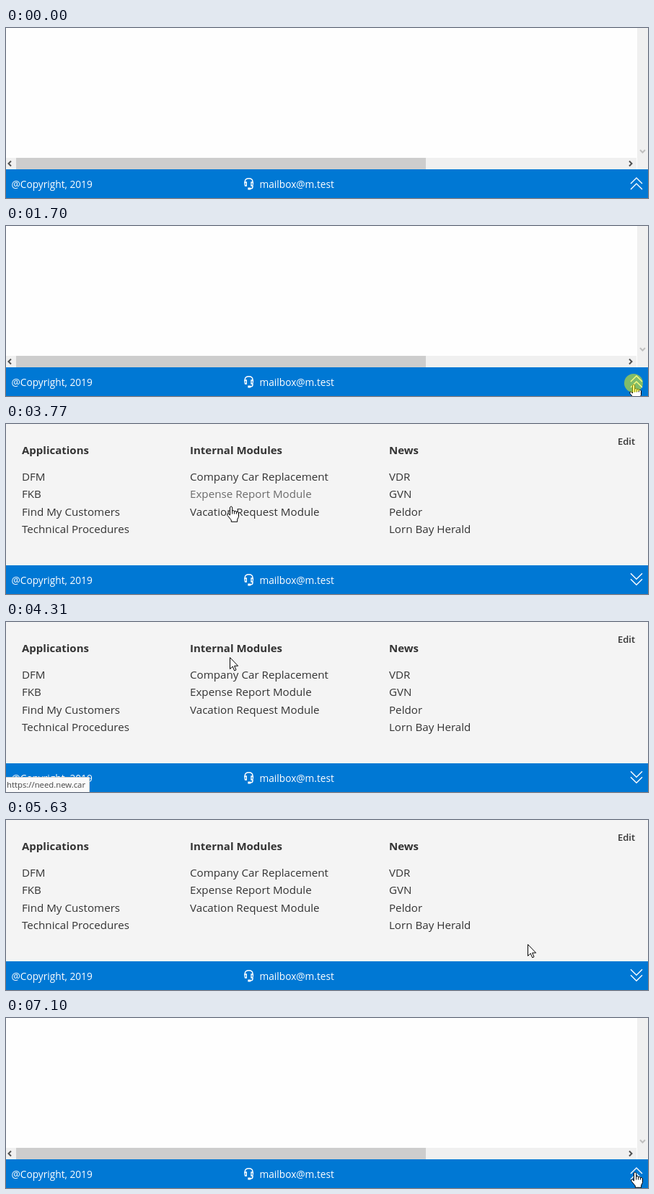
These frames come from a looping animation (890x237 px, 7.56 s). An HTML page:

```html
<!DOCTYPE html>
<html lang="en">
<head>
<meta charset="utf-8">
<title>Footer panel</title>
<style>
  html, body { margin: 0; width: 100%; height: 100%; overflow: hidden; background: #fff; }
  svg { display: block; width: 890px; height: 237px; font-family: "Open Sans", "Noto Sans", sans-serif; }
  .link { font-size: 15.16px; fill: #333; }
  .link.hover { fill: #6b6b6b; }
  .head { font-size: 15px; font-weight: 700; fill: #333; }
  .edit { font-size: 13px; font-weight: 600; fill: #333; }
  .foot { font-size: 13.7px; fill: #fff; }
  .line { fill: none; stroke: #fff; stroke-width: 1.4; }
  .pointer { fill: #fff; stroke: #000; stroke-linejoin: round; }
</style>
</head>
<body>
<svg viewBox="0 0 890 237">
  <rect width="890" height="237" fill="#fefefe"/>
  <g id="page">
    <rect x="875" width="15" height="197" fill="#f0f0f0"/>
    <rect y="181" width="874" height="16" fill="#f0f0f0"/>
    <rect x="14" y="181" width="568" height="16" fill="#cdcdcd"/>
    <g fill="none" stroke="#505050" stroke-width="2">
      <path d="M7 185.5L3.5 189L7 192.5M864 185.5L867.5 189L864 192.5"/>
      <path d="M879 170L882.5 173.5L886 170" stroke="#bfbfbf"/>
    </g>
  </g>
  <g id="panel">
    <rect width="890" height="197" fill="#f4f4f4"/>
    <text class="edit" x="848" y="29">Edit</text>
  </g>
  <rect y="197" width="890" height="40" fill="#0078d4"/>
  <text class="foot" x="7.5" y="223">@Copyright, 2019</text>
  <text class="foot" x="351.5" y="223">mailbox@m.test</text>
  <g class="line">
    <path d="M331.2 216V214.5Q331.2 209.7 336.6 209.7Q342 209.7 342 214.5V216M342 220V221.5Q342 224 338.5 224"/>
    <path d="M333.3 215H331Q330.5 217.5 331.5 220H333.3ZM340 215H342.3Q342.8 217.5 341.8 220H340ZM336 223.3H338.5V224.7H336Z"/>
  </g>
  <g id="chevron"><path class="line" d="M866 8L874 0L882 8M866 16L874 8L882 16"/></g>
  <g id="status">
    <rect x="-.5" y="216.5" width="116" height="21" fill="#fafafa" stroke="#d0d0d0"/>
    <text x="1" y="231" font-size="11.33" fill="#444">https://need.new.car</text>
  </g>
  <path id="arrow" class="pointer" d="M.5 .5V16.5L4.2 13L6.7 18.8L9 17.8L6.6 12.2H11.6Z"/>
  <g id="hand" class="pointer">
    <path d="M-1.5 2Q0 -.3 1.7 2V7Q3.3 5.8 4.6 7.5Q6 6.6 7.4 8.3Q9.6 7.6 10.5 10V15.5L8.7 19V22.3H.3V20L-5 13.5Q-6 10.6 -3.6 11L-1.5 13Z"/>
    <path d="M1.7 7V11.5M4.6 7.5V11.5M7.4 8.3V11.5" fill="none"/>
  </g>
  <circle id="click" r="13" fill="#ff0" fill-opacity=".5"/>
</svg>
<script>
const LOOP = 7560, TICK = LOOP / 98;
const el = id => document.getElementById(id);
const show = (node, on) => node.setAttribute("display", on ? "inline" : "none");
const within = (t, from, to) => t >= from && t < to;
const place = (node, x, y) => node.setAttribute("transform", `translate(${x} ${y})`);

const columns = [
  [22, "Applications", "DFM", "FKB", "Find My Customers", "Technical Procedures"],
  [255, "Internal Modules", "Company Car Replacement", "Expense Report Module", "Vacation Request Module"],
  [531, "News", "VDR", "GVN", "Peldor", "Lorn Bay Herald"]
];

function addText(cls, x, y, str) {
  const node = document.createElementNS("http://www.w3.org/2000/svg", "text");
  node.setAttribute("class", cls);
  node.setAttribute("x", x);
  node.setAttribute("y", y);
  node.textContent = str;
  el("panel").appendChild(node);
  return { node, x, y, width: node.getComputedTextLength() };
}

const links = columns.flatMap(([x, title, ...items]) => {
  addText("head", x, 42, title);
  return items.map((name, i) => addText("link", x, 78.7 + 24.4 * i, name));
});

// Pointer stops: tick, x, y, ticks to rest there
const stops = [
  [6, 581, 7], [15, 822, 216], [22, 870, 220, 6],
  [34, 647, 81], [38, 485, 56], [48, 318, 91],
  [49, 312, 114], [51, 311, 122], [53, 311, 112],
  [56, 310, 49], [58, 312, 34, 1],
  [65, 450, 60], [70, 562, 118],
  [73, 723, 173], [77, 854, 206, 2], [83, 872, 214]
];

function pointerAt(t) {
  const tick = Math.floor((t + 22) / TICK);
  const i = stops.findLastIndex(s => s[0] <= tick);
  if (i < 0) return null;
  const [start, x, y, rest = 0] = stops[i];
  const [end, nx, ny] = stops[i + 1] || [LOOP, x, y];
  const u = Math.max(0, (tick - start - rest) / (end - start - rest));
  return [Math.round(x + (nx - x) * u), Math.round(y + (ny - y) * u)];
}

const isOver = (link, [x, y]) =>
  within(x, link.x, link.x + link.width) && within(y, link.y - 13.5, link.y + 11);

function draw(t) {
  const open = within(t, 1850, 7100);
  show(el("page"), !open);
  show(el("panel"), open);
  if (open) el("chevron").setAttribute("transform", "matrix(1 0 0 -1 0 224.3)");
  else place(el("chevron"), 0, 209);

  const pos = pointerAt(t);
  const target = open && pos && links.find(link => isOver(link, pos));
  for (const link of links) link.node.classList.toggle("hover", link === target);
  show(el("status"), within(t, 4228, 4860));

  const isHand = pos && (target || (pos[0] > 862 && pos[1] > 200));
  show(el("arrow"), pos && !isHand);
  show(el("hand"), isHand);
  if (pos) {
    place(el("arrow"), ...pos);
    place(el("hand"), ...pos);
    place(el("click"), pos[0], pos[1] - 1);
  }
  show(el("click"), within(t, 1700, 1850) || within(t, 6870, 6950));
}

const begin = performance.now();
function tick() {
  draw((performance.now() - begin) % LOOP);
  requestAnimationFrame(tick);
}
draw(0);
requestAnimationFrame(tick);
</script>
</body>
</html>
```
